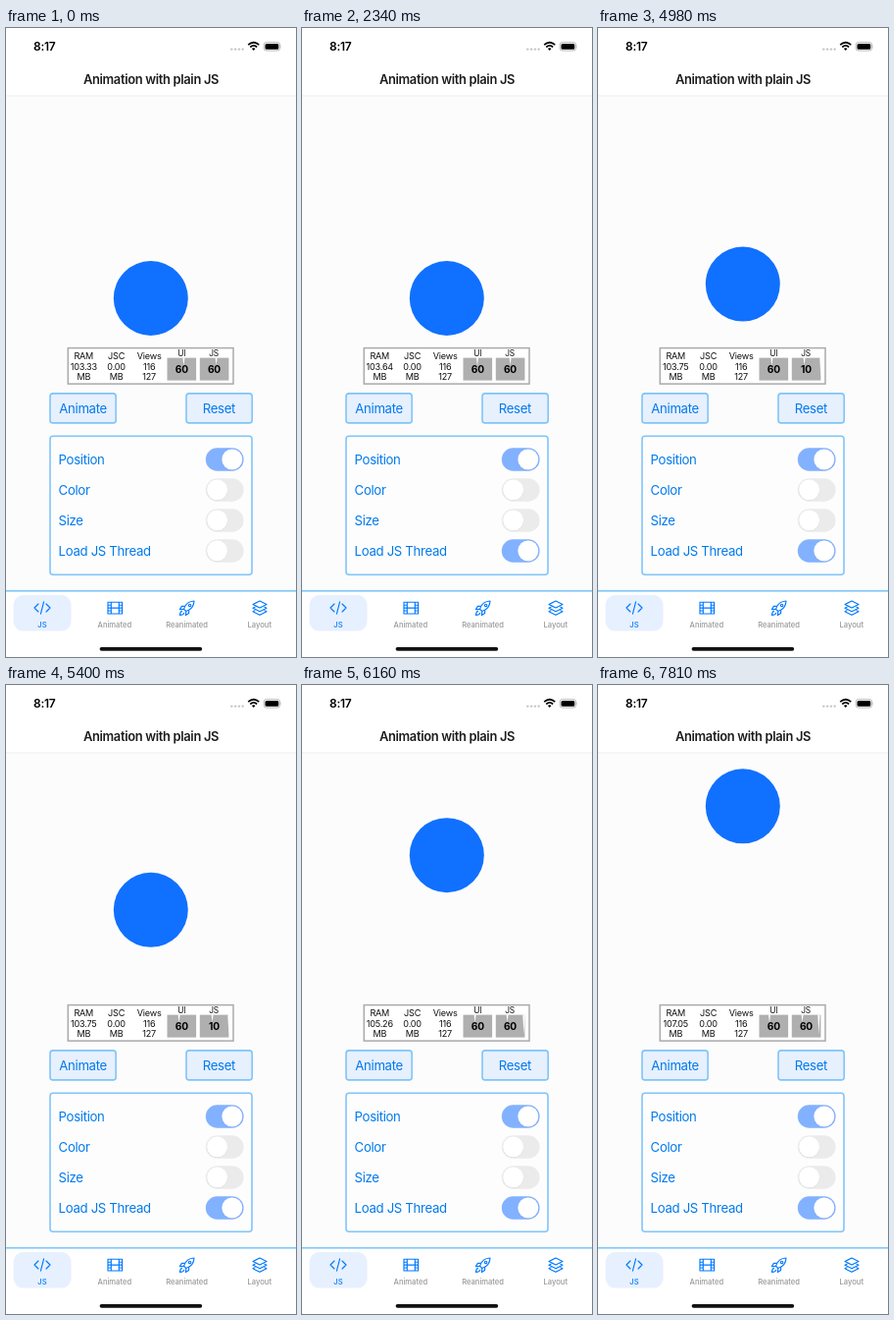
These frames come from a looping animation (296x640 px, 7840 ms). An HTML page:

```html
<!DOCTYPE html>
<html lang="en">
<head>
<meta charset="utf-8">
<title>Animation with plain JS</title>
<style>
  html, body { margin: 0; width: 100%; height: 100%; overflow: hidden; background: #fff; }
  svg { display: block; width: 100%; height: 100%; }
  text { font-family: Inter, Roboto, sans-serif; letter-spacing: -0.025em; }
  .mid { text-anchor: middle; }
  .label { font-size: 13.2px; fill: #007aee; }
  .stat { font-size: 9.1px; fill: #111; text-anchor: middle; }
  .fps { font-size: 10.2px; font-weight: 700; text-anchor: middle; }
  .tab { font-size: 7.6px; font-weight: 500; fill: #97979b; text-anchor: middle; letter-spacing: 0; }
  .box { fill: #e7f0fd; stroke: #7fc5fa; stroke-width: 1.6; }
  .icon { fill: none; stroke: #007aff; stroke-width: 1.15; stroke-linecap: round; stroke-linejoin: round; }
</style>
</head>
<body>
<svg id="stage" viewBox="0 0 296 640">
  <rect width="296" height="640" fill="#fff"/>
  <rect y="69" width="296" height="504" fill="#fcfcfc"/>
  <rect y="68.6" width="296" height=".8" fill="#e8e8e8"/>

  <!-- status bar and title -->
  <text x="28" y="23" font-size="12" font-weight="600">8:17</text>
  <g fill="#c4c4c6">
    <circle cx="230.3" cy="21.6" r="1.2"/><circle cx="234.1" cy="21.6" r="1.2"/>
    <circle cx="237.9" cy="21.6" r="1.2"/><circle cx="241.7" cy="21.6" r="1.2"/>
  </g>
  <g fill="none" stroke="#000" stroke-width="1.7">
    <path d="M247.2 17.2Q252.7 12.3 258.2 17.2"/>
    <path d="M249.3 19.5Q252.7 16.4 256.1 19.5"/>
  </g>
  <path d="M250.9 21.1Q252.7 19.6 254.5 21.1L252.7 23Z"/>
  <rect x="263.2" y="14.6" width="16.4" height="8.4" rx="2.5" fill="none" stroke="#a2a2a2" stroke-width=".8"/>
  <rect x="264.5" y="15.9" width="13.8" height="5.8" rx="1.5"/>
  <path d="M280.6 17.4q1.2 1.4 0 2.8z" fill="#a2a2a2"/>
  <text class="mid" x="148" y="57" font-size="12.9" font-weight="600" fill="#1c1c1e">Animation with plain JS</text>

  <circle id="ball" cx="147.8" cy="275" r="38" fill="#1070ff"/>

  <!-- performance monitor -->
  <rect x="63.3" y="325.6" width="168.7" height="36.5" fill="#fff" stroke="#aaa" stroke-width="1.5"/>
  <g class="stat">
    <text x="79.3" y="337">RAM</text><text id="ram" x="79.3" y="347.8"></text><text x="79.3" y="358.4">MB</text>
    <text x="112.6" y="337">JSC</text><text x="112.6" y="347.8">0.00</text><text x="112.6" y="358.4">MB</text>
    <text x="146.2" y="337">Views</text><text x="146.2" y="347.8">116</text><text x="146.2" y="358.4">127</text>
  </g>
  <g fill="#afafaf">
    <rect x="164.5" y="335.6" width="29.6" height="23"/>
    <rect x="197.8" y="335.6" width="29.6" height="23"/>
  </g>
  <path id="dips" fill="#fff"/>
  <text class="stat" x="179.4" y="334" style="font-size:8.4px">UI</text>
  <text class="stat" x="212" y="334" style="font-size:8.4px">JS</text>
  <text class="fps" x="179.3" y="351">60</text>
  <text class="fps" id="jsFps" x="212.4" y="351"></text>

  <!-- buttons and options -->
  <rect class="box" x="45" y="371.9" width="67.2" height="30" rx="3"/>
  <rect class="box" x="184" y="371.9" width="67.2" height="30" rx="3"/>
  <text class="label mid" id="animate" x="78.6" y="391.8">Animate</text>
  <text class="label mid" x="217.4" y="391.8">Reset</text>
  <rect class="box" x="45" y="415.2" width="206" height="141" rx="3" style="fill:#fdfdfd"/>
  <g id="options"></g>

  <!-- tab bar -->
  <rect y="573" width="296" height="67" fill="#fff"/>
  <rect y="571.9" width="296" height="1.7" fill="#82c8fa"/>
  <rect x="7.6" y="577" width="59" height="36.6" rx="10" fill="#e7f0fe"/>
  <g class="icon">
    <path d="M33 586l-4 4 4 4M41 586l4 4-4 4M38.6 583.8l-3.2 12.4"/>
    <path d="M104 584.2h14.6v11.8h-14.6zM107.3 584.2v11.8M115.3 584.2v11.8M107.3 590.1h8M104 587.2h3.3M104 590.1h3.3M104 593h3.3M115.3 587.2h3.3M115.3 590.1h3.3M115.3 593h3.3"/>
    <path d="M181.5 591.2C183 586.5 187 583.2 192 583C191.8 588 188.5 592 183.8 593.5ZM182.6 588.4h-3.2l-2 3.2 4.1-.4M186.6 592.4v3.2l-3.2 2 .4-4.1M179.6 593.2c-1.6.5-2 2.2-2.1 4.2 2-.1 3.7-.5 4.2-2.1"/>
    <circle cx="187.6" cy="587.4" r="1.2"/>
    <path d="M259 583l7 3.5-7 3.5-7-3.5zM254 589.2l-2 1 7 3.5 7-3.5-2-1M254 592.8l-2 1 7 3.5 7-3.5-2-1"/>
  </g>
  <text class="tab" x="37" y="610" style="fill:#007aff">JS</text>
  <text class="tab" x="110.8" y="610">Animated</text>
  <text class="tab" x="184.6" y="610">Reanimated</text>
  <text class="tab" x="258.8" y="610">Layout</text>
  <rect x="95.6" y="630" width="104.6" height="3.7" rx="1.85" fill="#111"/>
</svg>
<script>
const LOOP = 7840;
const $ = id => document.getElementById(id);
const clamp = v => Math.max(0, Math.min(1, v));
const ease = p => p * p * (3 - 2 * p);

// Times at which the picture of the moving ball is refreshed.
const TICKS = [4870, 4980, 5100, 5200, 5300, 5400, 5500, 5620, 5720, 5840,
  5940, 6040, 6150, 6250, 6360, 6470, 6580, 6690, 6810];
const UI_SHIFTS = [190, 1310, 2340, 3270, 4280, 5300, 6470, 7340];
const JS_SHIFTS = [930, 1990, 2990, 4760, 5840, 7340];
const RAM = [[0, '103.33'], [330, '103.45'], [1310, '103.64'], [3270, '103.73'],
  [4600, '103.75'], [5620, '105.26'], [6810, '106.14'], [7810, '107.05']];
const JS_FPS = [[0, '60'], [4760, '10'], [5940, '60']];
const FADE = [[0, 1], [2990, .6], [3110, .3], [3270, .42], [3380, .6], [3490, .75], [4280, 1]];

const valueAt = (keys, t) => keys.filter(k => k[0] <= t).pop()[1];
const passed = (times, t) => times.filter(x => x <= t).length;

function addOption(name, y, on) {
  const g = document.createElementNS('http://www.w3.org/2000/svg', 'g');
  g.innerHTML = `<text class="label" x="53.6" y="${y + 4.8}">${name}</text>
    <rect x="203.8" y="${y - 11.8}" width="38.8" height="23.6" rx="11.8"/>
    <rect y="${y - 9.8}" height="21" rx="10.5" fill="#000" opacity=".1"/>
    <rect y="${y - 10.5}" height="21" rx="10.5" fill="#fff"/>`;
  $('options').append(g);
  const [track, shadow, knob] = g.querySelectorAll('rect');
  const set = (p, stretch = 0) => {
    const mix = (a, b) => Math.round(a + (b - a) * p);
    track.setAttribute('fill', `rgb(${mix(235, 130)},${mix(235, 177)},${mix(236, 255)})`);
    for (const r of [shadow, knob]) {
      r.setAttribute('x', 205.1 + (15.2 - stretch) * p);
      r.setAttribute('width', 21 + stretch);
    }
  };
  set(on);
  return set;
}

addOption('Position', 439, 1);
addOption('Color', 470, 0);
addOption('Size', 501, 0);
const setLoad = addOption('Load JS Thread', 532, 0);

const dip = (x, depth, half) => `M${x - half} 335.4h${2 * half}L${x} ${335.4 + depth}Z`;

function ballY(t) {
  if (t >= 7340) return 123.3;
  const n = passed(TICKS, t);
  return n ? 276.5 - 7.95 * n : 275;
}

function draw(t) {
  $('ball').setAttribute('cy', ballY(t));
  $('ram').textContent = valueAt(RAM, t);
  $('jsFps').textContent = valueAt(JS_FPS, t);
  $('animate').setAttribute('opacity', valueAt(FADE, t));

  const shifts = passed(JS_SHIFTS, t);
  let d = dip(181.4 - .8 * passed(UI_SHIFTS, t), 8.5, 1) + dip(214.6 - shifts, 7.5, 1);
  if (shifts > 3) d += dip(227.4 - (shifts - 4), 20, 1.1);
  $('dips').setAttribute('d', d);

  const s = 1200 + Math.floor((t - 1200) / 113.4) * 113.4;
  const stretch = s >= 1200 && s < 1860 ? 4 * clamp((1880 - s) / 300) : 0;
  setLoad(ease(clamp((s - 1300) / 480)), stretch);
}

const start = performance.now();
function frame() {
  draw((performance.now() - start) % LOOP);
  requestAnimationFrame(frame);
}
frame();
</script>
</body>
</html>
```
